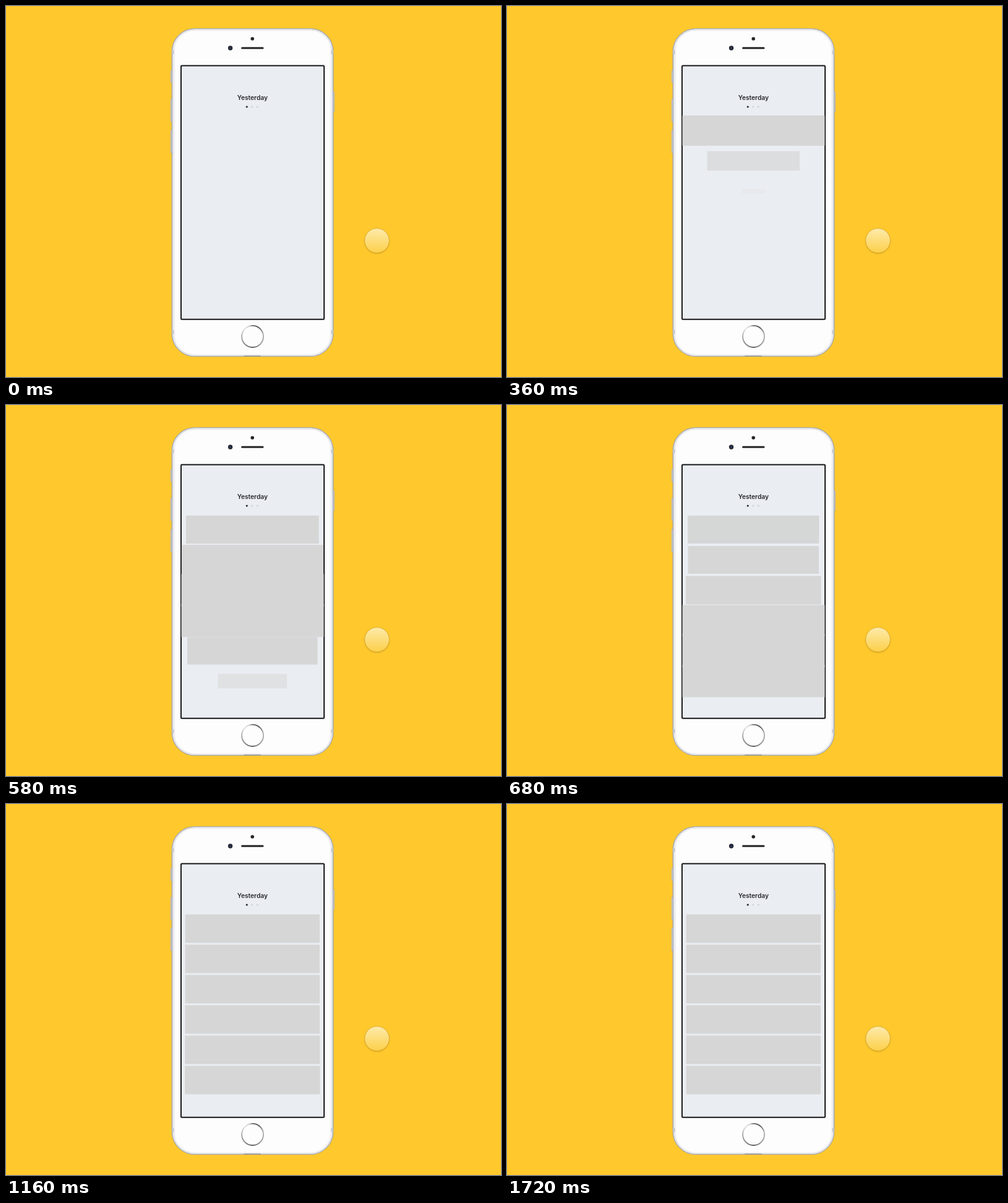
Animation of 800 by 600 pixels, one loop 1740 ms. Source, as an HTML page with a canvas:

```html
<!DOCTYPE html>
<html lang="en">
<head>
<meta charset="utf-8">
<title>Staggered cards</title>
<style>
html, body { margin: 0; width: 100%; height: 100%; overflow: hidden; background: #ffc92d; }
canvas { display: block; width: 800px; height: 600px; }
</style>
</head>
<body>
<canvas id="stage" width="800" height="600"></canvas>
<script>
const canvas = document.getElementById('stage');
const LOOP = 1740, STEP = 20;
const BARS = 6, DELAY = 200, STAGGER = 60;
const backdrop = document.createElement('canvas');
backdrop.width = 800;
backdrop.height = 600;
let ctx = backdrop.getContext('2d');

function box(x, y, w, h, r, fill) {
  ctx.beginPath();
  ctx.roundRect(x, y, w, h, r);
  if (fill) {
    ctx.fillStyle = fill;
    ctx.fill();
  }
}

function outline(color, width) {
  ctx.strokeStyle = color;
  ctx.lineWidth = width;
  ctx.stroke();
}

function disc(x, y, r, fill) {
  ctx.beginPath();
  ctx.arc(x, y, r, 0, Math.PI * 2);
  ctx.fillStyle = fill;
  ctx.fill();
}

function shade(x0, y0, x1, y1, stops) {
  const g = ctx.createLinearGradient(x0, y0, x1, y1);
  stops.forEach(([at, color]) => g.addColorStop(at, color));
  return g;
}

function sideButton(x, y, h) {
  box(x, y, 3.5, h, 1, '#d9d6d3');
  outline('#a9a49c', 0.7);
}

function drawPhone() {
  [[104, 20], [150.5, 36.5], [200.5, 37]].forEach(([y, h]) => sideButton(266, y, h));
  sideButton(527.2, 138.5, 32.5);

  box(268.2, 36.7, 260.6, 530, 37, shade(268, 0, 529, 0, [
    [0, '#d3d5db'], [0.012, '#f1f1f3'], [0.03, '#fafafa'],
    [0.97, '#fafafa'], [0.988, '#f1f1f3'], [1, '#d3d5db']
  ]));
  outline('#a3a4ad', 1.3);
  box(270.2, 38.5, 256.6, 526.4, 35);
  outline('#e3e4e8', 1.8);
  box(273.5, 41, 250, 521.5, 32, '#fdfdfd');

  // antenna bands
  for (const y of [71.5, 524]) {
    box(268, y, 3.5, 6.5, 0, '#c5c7cb');
    box(525.5, y, 3.5, 6.5, 0, '#c5c7cb');
  }
  box(384, 565.6, 28, 1.5, 0.7, '#8e8f96');

  disc(398.2, 53, 2.8, '#252527');
  disc(362.5, 68, 3.7, '#25262d');
  disc(362.3, 68, 1.6, '#2e3d70');
  box(380, 66.4, 36.5, 3.2, 1.6, '#202022');

  const ring = ctx.createConicGradient(-Math.PI / 2, 398.5, 534.5);
  [[0, '#77777a'], [0.1, '#5f5f62'], [0.22, '#b5b5b7'], [0.36, '#a0a0a2'],
   [0.5, '#5c5c5f'], [0.62, '#88888b'], [0.76, '#b3b3b5'],
   [0.88, '#e4e4e5'], [0.95, '#d0d0d2'], [1, '#77777a']
  ].forEach(([at, color]) => ring.addColorStop(at, color));
  ctx.beginPath();
  ctx.arc(398.5, 534.5, 17.5, 0, Math.PI * 2);
  outline(ring, 2);
}

function drawScreen() {
  box(282.9, 96.5, 231.2, 410.2, 1.5, '#eaedf2');
  outline('#161618', 2);
  ctx.fillStyle = '#26272a';
  ctx.font = '600 10.2px Inter, Lato, sans-serif';
  ctx.textAlign = 'center';
  ctx.fillText('Yesterday', 398.3, 151.6);
  disc(389.2, 163, 1.6, '#26272a');
  disc(397.7, 163, 1.5, '#d0d3d8');
  disc(406.2, 163, 1.5, '#d0d3d8');
}

function drawButton() {
  ctx.save();
  ctx.shadowColor = 'rgba(120, 80, 0, 0.35)';
  ctx.shadowBlur = 3;
  ctx.shadowOffsetY = 1;
  disc(599.5, 379.5, 19.8, shade(0, 360, 0, 399, [[0, '#fdeaab'], [1, '#fdd04a']]));
  ctx.restore();
  outline('rgba(190, 140, 30, 0.5)', 0.8);
}

// underdamped step response, time in ms
function spring(v) {
  if (v <= 0) return 0;
  const decay = 0.0081, freq = 0.0143;
  return 1 - Math.exp(-decay * v) *
    (Math.cos(freq * v) + decay / freq * Math.sin(freq * v));
}

function drawBars(t) {
  ctx.save();
  ctx.beginPath();
  ctx.rect(283.5, 97, 230, 409);
  ctx.clip();
  for (let i = 0; i < BARS; i++) {
    const s = spring(t - DELAY - i * STAGGER);
    if (s <= 0) continue;
    const w = 217.5 * s, h = 46 * s;
    ctx.globalAlpha = Math.min(1, s);
    box(398.25 - w / 2, 201.5 + i * 49 - h / 2, w, h, s, '#d6d6d6');
  }
  ctx.restore();
}

ctx.fillStyle = '#ffc92d';
ctx.fillRect(0, 0, 800, 600);
drawPhone();
drawScreen();
drawButton();
ctx = canvas.getContext('2d');

const start = performance.now();
function frame(now) {
  const t = Math.floor(Math.max(0, now - start) % LOOP / STEP) * STEP;
  ctx.drawImage(backdrop, 0, 0);
  drawBars(t);
  requestAnimationFrame(frame);
}
frame(start);
</script>
</body>
</html>
```
